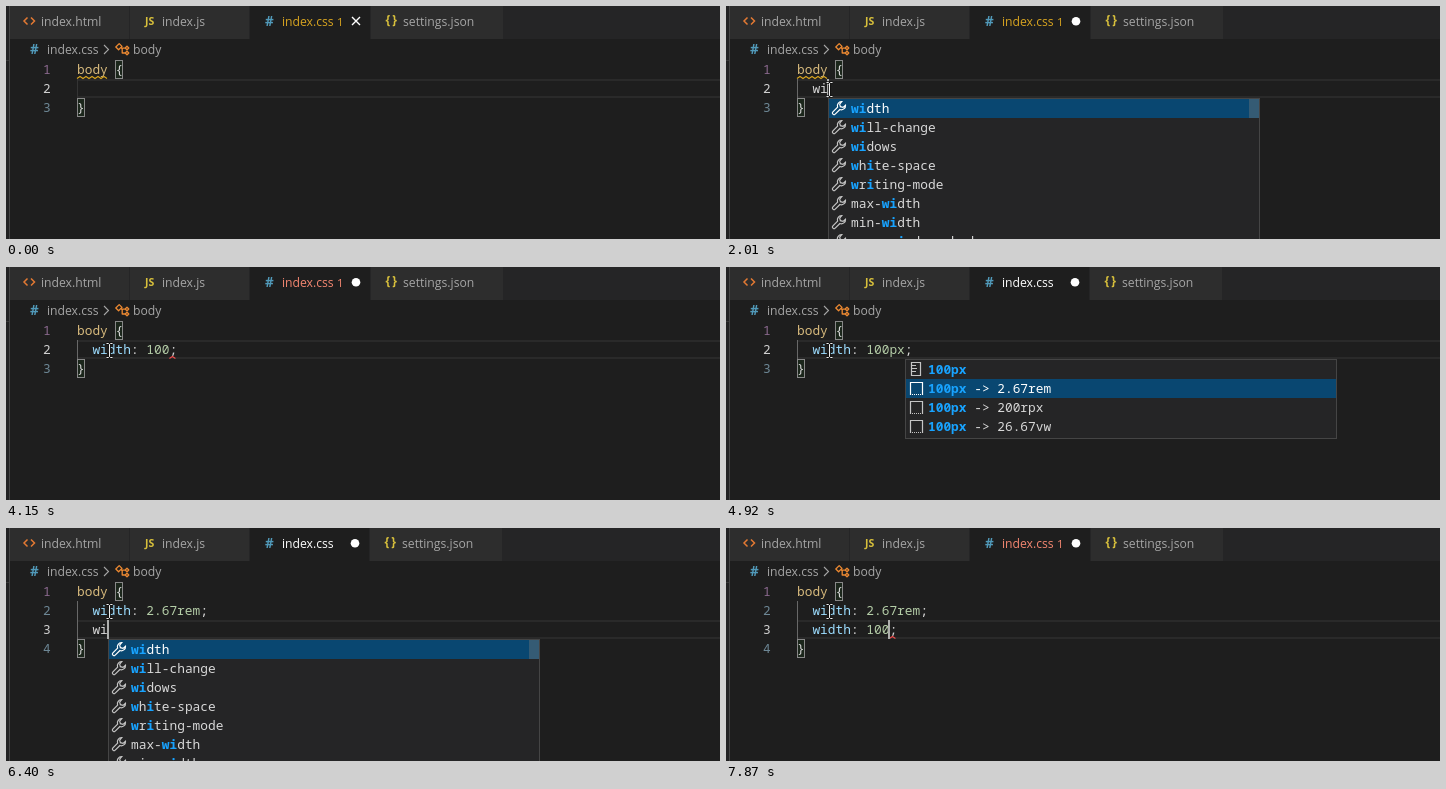
These frames come from a looping animation (714x233 px, 8000 ms). An HTML page:

```html
<!DOCTYPE html>
<html lang="en">
<head>
<meta charset="utf-8">
<title>CSS unit completion</title>
<style>
html, body { margin: 0; width: 100%; height: 100%; overflow: hidden; background: #1e1e1e; }
svg { display: block; }
text { white-space: pre; }
.ui { font: 12.2px "Open Sans", "Noto Sans", sans-serif; }
.code { font: 500 12.83px "Noto Sans Mono", "DejaVu Sans Mono", monospace; }
.bold { font-weight: 700; }
</style>
</head>
<body>
<svg id="stage" width="714" height="233" viewBox="0 0 714 233"></svg>
<script>
const LOOP = 8000, COL = 7.7, ROW = 19, LEFT = 71, TOP = 54;
const stage = document.getElementById('stage');
const YELLOW = '#d9a520', RED = '#f48771', LIGHT = '#d8d8d8', BLUE = '#519aba', MATCH = '#18a3ff', MUTED = '#a6a6a6';

// Each track is a list of [start time, value].
const firstLine = [
  [0, ''], [1690, '  w'], [1840, '  wi'], [2330, '  width: ;'], [3260, '  width: 1;'],
  [3490, '  width: 10;'], [3660, '  width: 100;'], [4210, '  width: 100p;'],
  [4350, '  width: 100px;'], [5150, '  width: 2.67rem;']
];
const secondLine = [
  [0, ''], [6080, '  w'], [6230, '  wi'], [6780, '  width: ;'],
  [7640, '  width: 1;'], [7780, '  width: 10;'], [7870, '  width: 100;']
];
const popupTrack = [
  [0, null], [2010, 'property'], [2330, null], [2400, 'value'], [3260, null], [4280, 'partial'],
  [4350, 'pixel'], [5150, null], [6300, 'property'], [6780, null], [6860, 'value'], [7640, null]
];
const problemTrack = [[0, YELLOW], [3110, RED], [4350, null], [7400, RED]];
const caretTrack = [
  [0, false], [700, true], [1230, false], [1690, true], [2940, false], [3260, true],
  [4150, false], [4210, true], [4920, false], [5150, true], [7240, false], [7640, true]
];
const squiggleTrack = [[0, 'body'], [2940, 'value'], [4350, null], [7240, 'value']];

// Completion rows: icon and label, with the matched letters in brackets.
const conversions = ['2.67rem', '200rpx', '26.67vw'];
const popups = {
  property: {
    x: 102, thumb: 19,
    rows: ['[wi]dth', '[wi]ll-change', '[wi]dows', '[w]h[i]te-space', '[w]r[i]ting-mode',
      'max-[wi]dth', 'min-[wi]dth', '-moz-[wi]ndow-shadow'].map(s => ['wrench', s])
  },
  value: {
    x: 140, thumb: 115,
    rows: [...['auto', 'fit-content', 'max-content', 'min-content'].map(s => ['keyword', s]),
      ...['0%', '0ch', '0cm', '0em'].map(s => ['ruler', s])]
  },
  partial: {
    x: 179,
    rows: [...['[100p]x', '[100p]c', '[100p]t'].map(s => ['ruler', s]),
      ...conversions.map(s => ['snippet', '[100p]x -> ' + s])]
  },
  pixel: {
    x: 179,
    rows: [['ruler', '[100px]'], ...conversions.map(s => ['snippet', '[100px] -> ' + s])]
  }
};

const at = (track, t) => track.reduce((value, [start, next]) => t >= start ? next : value, track[0][1]);
const rect = (x, y, w, h, fill, extra = '') =>
  `<rect x="${x}" y="${y}" width="${w}" height="${h}" fill="${fill}" ${extra}/>`;
const path = (d, stroke, width = 1, extra = '') =>
  `<path d="${d}" fill="none" stroke="${stroke}" stroke-width="${width}" ${extra}/>`;
const span = (s, fill, weight = 500) =>
  `<tspan fill="${fill}" font-weight="${weight}">${s.replace(/>/g, '&gt;')}</tspan>`;
const text = (x, y, s, fill, cls = 'ui', extra = '') =>
  `<text x="${x}" y="${y}" fill="${fill}" class="${cls}" ${extra}>${s}</text>`;
const lineTop = line => TOP + (line - 1) * ROW;
const code = (x, line, s, fill = LIGHT) => text(x, lineTop(line) + 14, s, fill, 'code');

function icon(name, x, y, selected) {
  const white = selected ? '#fff' : '#c5c5c5';
  const orange = selected ? '#fff' : '#ee9d28';
  const shapes = {
    wrench: () => path('M10.8 1.6A4.2 4.2 0 0 0 6.6 7.2L1.9 11.9a1.6 1.6 0 0 0 2.3 2.3L8.9 9.5A4.2 4.2 0 0 0 14.5 5.2L12 7.4 9.4 6.7 8.7 4.1Z', white, 1.2),
    keyword: () => path('M6.5 6.5V2.5H14.5V8.5H10.5M8.5 4.5H12.5M1.5 7.5H9.5V13.5H1.5ZM3.5 9.5H7.5M3.5 11.5H7.5', orange, 1.1),
    ruler: () => path('M3.5 1.5H12.5V14.5H3.5ZM4 4.5H8M4 7.5H9M4 10.5H8', white, 1.2),
    snippet: () => path('M2.5 15V2.5H14.5V15', white, 1.2) + path('M2 14.5H15', white, 1, 'stroke-dasharray="1 1"')
  };
  return `<g transform="translate(${x} ${y - .5})">${shapes[name]()}</g>`;
}

function tabs(problem, dirty) {
  const shift = problem ? 0 : -1;
  const edge = 364 + shift, next = 397 + shift;
  const color = problem || '#fff', mark = 350 + shift;
  return rect(4, 0, 710, 33, '#252526')
    + rect(4, 0, 119, 33, '#2d2d2d') + rect(124, 0, 119, 33, '#2d2d2d')
    + rect(244, 0, edge - 244, 33, '#1e1e1e') + rect(edge + 1, 0, 132, 33, '#2d2d2d')
    + path('M21.5 11.5L18 15L21.5 18.5M25 11.5L28.5 15L25 18.5', '#e37933', 1.5)
    + text(35, 20, 'index.html', MUTED)
    + text(139, 19, 'JS', '#d8c03c', 'ui bold', 'style="font-size:10.5px"')
    + text(156, 20, 'index.js', MUTED)
    + text(259, 19.5, '#', BLUE, 'ui bold', 'style="font-size:13.5px"')
    + text(276, 20, 'index.css', color)
    + (problem ? text(331, 20, '1', problem, 'ui', 'style="font-size:11.5px"') : '')
    + (dirty ? `<circle cx="${mark}" cy="15.3" r="4.3" fill="#fff"/>`
      : path(`M${mark - 4} 11L${mark + 4} 19M${mark + 4} 11L${mark - 4} 19`, '#fff', 1.4))
    + text(next - 17.5, 18, '{}', '#d8c03c', 'ui bold', 'style="font-size:12px;letter-spacing:2px"')
    + text(next, 20, 'settings.json', MUTED);
}

function breadcrumb() {
  return text(24, 47.5, '#', BLUE, 'ui bold', 'style="font-size:13.5px"')
    + text(41, 48, 'index.css', MUTED)
    + path('M98 39L102.5 43.5L98 48', MUTED, 1.1)
    + path('M109.8 41L113.2 37.6L116 40.4L112.6 43.8ZM115 42.2H119M116.2 42.2V47H119M119.2 42L121 40.2L122.8 42L121 43.8ZM119.2 47L121 45.2L122.8 47L121 48.8Z', '#ee8a32', 1.3, 'stroke-linejoin="round"')
    + text(127, 48, 'body', MUTED);
}

function declaration(s) {
  const parts = s.match(/^( +)(width)(: )(.*)(;)$/);
  if (!parts) return s;
  const colors = [LIGHT, '#9cdcfe', LIGHT, '#b5cea8', LIGHT];
  return parts.slice(1).map((part, i) => span(part, colors[i])).join('');
}

function squiggle(x, line, width, color) {
  const y = lineTop(line) + 17;
  let d = `M${x} ${y + 1.5}`;
  for (let i = 3, up = true; i <= width; i += 3, up = !up) {
    d += `L${x + i} ${y + (up ? -0.5 : 1.5)}`;
  }
  return path(d, color, 1.1);
}

function popup(name, line, selected) {
  const { x, rows, thumb } = popups[name];
  const y = lineTop(line) + ROW;
  let out = rect(x + .5, y + .5, 431, rows.length * ROW + 3, '#252526', 'stroke="#454545"');
  rows.forEach(([kind, label], i) => {
    const top = y + 1 + i * ROW;
    if (i === selected) out += rect(x + 1, top, 430, ROW, '#094771');
    const plain = i === selected ? '#fff' : LIGHT;
    const spans = label.split(/[\[\]]/)
      .map((s, k) => k % 2 ? span(s, MATCH, 700) : span(s, plain)).join('');
    out += icon(kind, x + 3, top + 1.5, i === selected) + text(x + 23, top + 14, spans, LIGHT, 'code');
  });
  if (thumb) out += rect(x + 421, y + 1, 10, thumb, '#797979', 'fill-opacity=".4"');
  return out;
}

function pointer(t) {
  if (t < 70) return '';
  const step = Math.min(8, Math.floor((t - 70) / 78));
  const rest = (1 - step / 8) ** 2;
  const x = Math.round(103 + 328 * rest) + .5, y = Math.round(84 + 101 * rest);
  const d = `M${x - 3} ${y - 7.5}H${x - 1}L${x} ${y - 6.5}L${x + 1} ${y - 7.5}H${x + 3}`
    + `M${x} ${y - 6.5}V${y + 5.5}M${x - 3} ${y + 6.5}H${x - 1}L${x} ${y + 5.5}L${x + 1} ${y + 6.5}H${x + 3}`;
  const click = t >= 694 && t < 850
    ? '<circle cx="101" cy="83" r="15" fill="#ff0" fill-opacity=".47"/>' : '';
  return click + path(d, '#111', 2.6) + path(d, '#eee');
}

function draw(t) {
  const split = t >= 5760;
  const current = split ? 3 : 2, last = current + 1;
  const lines = [at(firstLine, t), at(secondLine, t)];
  const active = lines[current - 2];
  const atEnd = !active.endsWith(';') || (t >= 5450 && !split);
  const caretCol = active ? active.length - (atEnd ? 0 : 1) : 2;
  const name = at(popupTrack, t), mark = at(squiggleTrack, t);
  const y = lineTop(current), closeY = lineTop(last);
  const bracket = (x, top) => rect(x, top + .5, 7, 18, '#1b261b', 'stroke="#888"');

  let out = rect(0, 0, 714, 233, '#1e1e1e') + rect(0, 0, 3, 233, '#212122')
    + rect(3, 0, 1, 233, '#444') + rect(0, 54, 3, 1, '#383838')
    + tabs(at(problemTrack, t), t >= 1690) + breadcrumb()
    + rect(72, y, 642, 2, '#2a2a2a') + rect(72, y + 17, 642, 2, '#2a2a2a')
    + rect(71, lineTop(2), 1, (last - 2) * ROW, t < 1690 ? '#343434' : '#686868')
    + bracket(109.5, TOP) + bracket(71.5, closeY);
  for (let n = 1; n <= last; n++) {
    out += code(37, n, n, n === current ? '#d0d0d0' : n === 1 ? '#8c6a90' : '#6d8795');
  }
  out += code(LEFT, 1, span('body', '#d7ba7d') + span(' {', LIGHT)) + code(LEFT, last, '}');
  lines.forEach((s, i) => { if (s) out += code(LEFT, i + 2, declaration(s)); });

  if (mark === 'body') out += squiggle(LEFT, 1, 31, YELLOW);
  if (mark === 'value') out += squiggle(LEFT + (active.length - 1) * COL, current, 8, '#f14c4c');
  if (at(caretTrack, t)) out += rect(Math.floor(LEFT + caretCol * COL - .5), y, 2, ROW, '#aeafad');
  if (name) out += popup(name, current, name === 'pixel' && t >= 4830 ? 1 : 0);
  return out + pointer(t);
}

let shown = '';
const began = performance.now();
function tick() {
  const picture = draw((performance.now() - began) % LOOP);
  if (picture !== shown) stage.innerHTML = shown = picture;
  requestAnimationFrame(tick);
}
tick();
</script>
</body>
</html>
```
